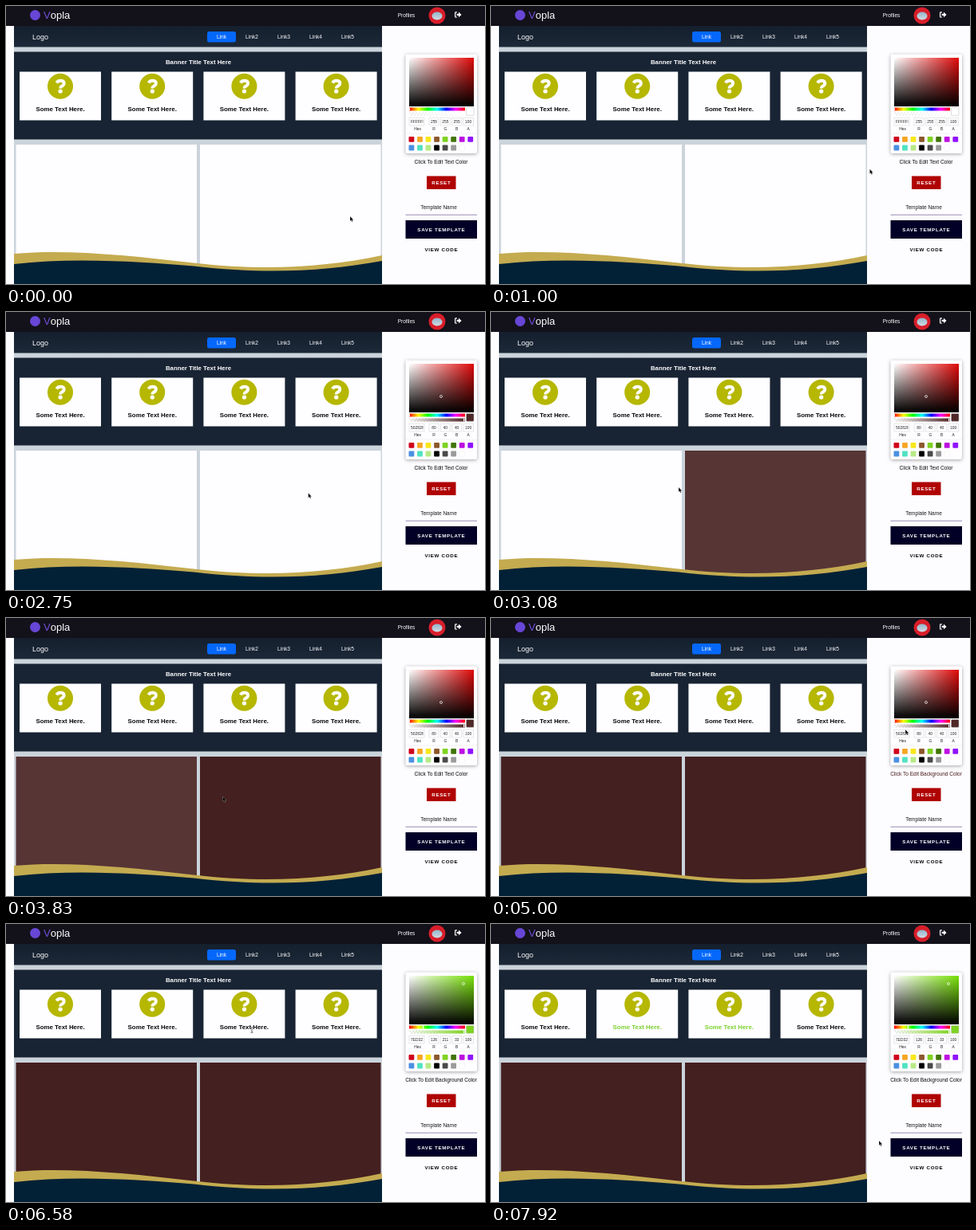
Animation, 600 px wide and 349 px high, one loop 8000 ms. Source, as an HTML page with a canvas:

```html
<!DOCTYPE html>
<html lang="en">
<head>
<meta charset="utf-8">
<title>Template editor</title>
<style>
  html, body { margin: 0; width: 100%; height: 100%; overflow: hidden; background: #fdfcfe; }
  canvas { display: block; width: 600px; height: 349px; }
</style>
</head>
<body>
<canvas id="stage"></canvas>
<script>
const LOOP = 8000;
const canvas = document.getElementById('stage');
const ctx = canvas.getContext('2d');
const ratio = window.devicePixelRatio || 1;
canvas.width = 600 * ratio;
canvas.height = 349 * ratio;

const INK = '#08080c', NAVY = '#182433', WHITE = '#fefdff';

// Clicks that change the page, in ms
const PICK_BROWN = 2150, FILL_RIGHT = 2800, FILL_LEFT = 3500,
      TEXT_MODE = 4500, PICK_GREEN = 5500, TINT_THIRD = 6660, TINT_SECOND = 7250;

const PICKS = [
  { from: PICK_GREEN, hex: '7ED321', rgb: [126, 211, 33], hue: 89, x: 573, y: 75 },
  { from: PICK_BROWN, hex: '502828', rgb: [80, 40, 40], hue: 0, x: 545, y: 106 },
  { from: 0, hex: 'FFFFFF', rgb: [255, 255, 255], hue: 0, x: 505.5, y: 65.5 }
];
const PRESETS = ('D0021B F5A623 F8E71C 8B572A 7ED321 417505 BD10E0 9013FE ' +
                 '4A90E2 50E3C2 B8E986 000000 4A4A4A 9B9B9B FFFFFF').split(' ');

// Pointer stops: time, x, y
const PATH = [
  [0, 431, 264], [500, 431, 264], [1700, 546, 107], [2250, 546, 107],
  [2650, 385, 226], [2820, 375, 228], [3080, 235, 220], [3350, 165, 236],
  [3550, 165, 236], [4350, 541, 195], [4600, 541, 195], [5000, 519, 140],
  [5380, 549, 167], [5600, 549, 167], [6450, 308, 133], [6750, 308, 133],
  [7130, 197, 131], [7370, 197, 131], [7900, 486, 272], [8000, 486, 272]
];

const clamp = v => Math.max(0, Math.min(1, v));
const smooth = v => v * v * (3 - 2 * v);

function pointerAt(t) {
  const i = PATH.findIndex(stop => stop[0] > t);
  const [t0, x0, y0] = PATH[i - 1], [t1, x1, y1] = PATH[i];
  const k = smooth((t - t0) / (t1 - t0));
  return [x0 + (x1 - x0) * k, y0 + (y1 - y0) * k];
}

function box(x, y, w, h, fill, radius = 0, stroke) {
  ctx.beginPath();
  ctx.roundRect(x, y, w, h, radius);
  if (fill) { ctx.fillStyle = fill; ctx.fill(); }
  if (stroke) { ctx.strokeStyle = stroke; ctx.lineWidth = 0.5; ctx.stroke(); }
}

function disc(x, y, r, fill) {
  ctx.beginPath();
  ctx.arc(x, y, r, 0, 7);
  ctx.fillStyle = fill;
  ctx.fill();
}

function text(str, x, y, size, color, { bold = false, align = 'center', spacing = 0 } = {}) {
  ctx.font = `${bold ? 'bold ' : ''}${size}px "Liberation Sans", Arial, sans-serif`;
  ctx.textAlign = align;
  ctx.letterSpacing = spacing + 'px';
  ctx.fillStyle = color;
  ctx.fillText(str, x + spacing / 2, y);
}

function gradient(x0, y0, x1, y1, colors) {
  const g = ctx.createLinearGradient(x0, y0, x1, y1);
  colors.forEach((c, i) => g.addColorStop(i / (colors.length - 1), c));
  return g;
}

function shape(path, fill, stroke, width) {
  const p = new Path2D(path);
  if (fill) { ctx.fillStyle = fill; ctx.fill(p); }
  if (stroke) { ctx.strokeStyle = stroke; ctx.lineWidth = width; ctx.stroke(p); }
}

function at(x, y, draw) {
  ctx.save();
  ctx.translate(x, y);
  draw();
  ctx.restore();
}

function header() {
  box(0, 0, 600, 25, '#13111a');
  disc(36.5, 11.5, 6.5, '#6846d6');
  text('V', 47, 16, 13, '#7350e0', { align: 'left' });
  const lead = ctx.measureText('V').width;
  text('opla', 47 + lead, 16, 13, WHITE, { align: 'left' });
  text('Profiles', 501.5, 13.7, 6.5, WHITE);
  disc(540, 12, 10.5, '#d81e2a');
  ctx.beginPath();
  ctx.ellipse(540, 12.5, 6.5, 5, 0, 0, 7);
  ctx.fillStyle = gradient(540, 7, 540, 18, ['#8fb2c8', '#d5dde5']);
  ctx.fill();
  shape('M565 7.8H563.2Q562.6 7.8 562.6 8.4V13.4Q562.6 14 563.2 14H565', null, WHITE, 1.2);
  shape('M564.6 9.8H567V7.6L570.6 10.9L567 14.2V12H564.6Z', WHITE);
}

function card(i, color) {
  const x = 17 + 115.2 * i, center = x + 51;
  box(x, 82.5, 102, 61, WHITE);
  disc(center, 100.8, 16, '#b5b700');
  at(center, 100.8, () => {
    shape('M-4.8 -4.4Q-2.8 -7.1 .3 -7.1C6 -7.1 5.6 -1.8 2 -.2Q.1 .8 .1 2.6', null, WHITE, 3.9);
    disc(0.1, 6.3, 2.7, WHITE);
  });
  text('Some Text Here.', center, 132, 7.9, color, { bold: true });
}

// White until clicked, then brown that settles into a deeper shade
function panelColor(t, click) {
  if (t < click) return WHITE;
  const k = smooth(clamp((t - click - 330) / 300));
  const mix = (a, b) => Math.round(a + (b - a) * k);
  return `rgb(${mix(87, 68)},${mix(53, 32)},${mix(53, 32)})`;
}

function page(t) {
  box(10, 25, 461, 324, '#cbd3db');
  box(10, 25, 461, 26.5, gradient(0, 25, 0, 52, ['#151f2d', '#1c2938']));
  text('Logo', 33, 41.6, 9, WHITE, { align: 'left' });
  box(252, 32, 36, 13.5, '#0568fb', 2.5);
  ['Link', 'Link2', 'Link3', 'Link4', 'Link5'].forEach((label, i) =>
    text(label, i ? 268 + 40 * i : 270, 41, 6.6, WHITE));

  box(10, 57.5, 461, 110, NAVY);
  text('Banner Title Text Here', 241, 73.2, 7.8, WHITE, { bold: true });
  const tints = [Infinity, TINT_SECOND, TINT_THIRD, Infinity];
  tints.forEach((click, i) => card(i, t < click ? INK : '#7bd12c'));

  box(12.5, 174, 226.5, 160, panelColor(t, FILL_LEFT));
  box(243, 174, 226.5, 160, panelColor(t, FILL_RIGHT));
  box(239, 174, 4, 160, '#cbd3db');
  shape('M10 311C75 305 155 313 235 322.5C325 333 400 328 471 313V349H10Z', '#c4ab50');
  shape('M10 324C85 315 170 321 235 326.5C325 337 400 333 471 320V349H10Z', '#022136');
}

function picker(t) {
  const pick = PICKS.find(p => t >= p.from);
  const color = '#' + pick.hex;

  ctx.save();
  ctx.shadowColor = 'rgba(0,0,0,.35)';
  ctx.shadowBlur = 4 * ratio;
  ctx.shadowOffsetY = ratio;
  box(500.5, 60.5, 89.5, 124.5, WHITE, 2);
  ctx.restore();

  box(505, 65, 81, 61, `hsl(${pick.hue} 92% 46%)`);
  box(505, 65, 81, 61, gradient(505, 0, 586, 0, ['#fff', '#fff0']));
  box(505, 65, 81, 61, gradient(0, 65, 0, 126, ['#0000', '#000']));
  ctx.beginPath();
  ctx.arc(pick.x, pick.y, 1.5, 0, 7);
  ctx.strokeStyle = '#fff';
  ctx.lineWidth = 0.7;
  ctx.stroke();

  const rainbow = [0, 60, 120, 180, 240, 300, 360].map(h => `hsl(${h} 100% 50%)`);
  box(505, 127.5, 70, 4, gradient(505, 0, 575, 0, rainbow));
  box(504.5 + pick.hue / 360 * 70, 127.7, 1.4, 3.6, '#fff');
  for (let i = 0; i < 70; i++)
    box(505 + 2 * (i >> 1), 133.5 + 2 * (i & 1), 2, 2, (i + (i >> 1)) & 1 ? '#fff' : '#e8e8e8');
  box(505, 133.5, 70, 4, gradient(505, 0, 575, 0, [color + '00', color]));
  box(573, 133.7, 1.4, 3.6, '#fff');
  box(576.5, 127.5, 9.5, 9.8, color, 1, '#bbb');

  const fields = [['Hex', pick.hex, 505, 19], ['R', pick.rgb[0], 530, 12],
                  ['G', pick.rgb[1], 544.3, 12], ['B', pick.rgb[2], 558.6, 12], ['A', 100, 572.9, 12.6]];
  for (const [label, value, x, w] of fields) {
    box(x, 140.3, w, 9.7, WHITE, 0, '#ccc');
    ctx.save();
    ctx.beginPath();
    ctx.rect(x + 1, 140, w - 2.5, 10);
    ctx.clip();
    if (label === 'Hex') text(value, x + 2, 147.1, 4.9, '#222', { align: 'left' });
    else text(String(value), x + w / 2, 147.1, 4.9, '#222');
    ctx.restore();
    text(label, x + w / 2 + (label === 'Hex' ? 1 : 0), 156, 4.9, '#222');
  }
  box(500.5, 159.7, 89.5, 0.5, '#e8e8e8');
  PRESETS.forEach((hex, i) =>
    box(504.5 + 10.55 * (i % 8), i < 8 ? 164 : 174.6, 6.8, 6.8, '#' + hex, 1, hex === 'FFFFFF' ? '#eee' : null));
}

function sidebar(t) {
  picker(t);
  const mode = t < TEXT_MODE ? 'Text' : 'Background';
  const hovered = t > TEXT_MODE && t < PICK_GREEN;
  text(`Click To Edit ${mode} Color`, 545, 198.2, 6.5, hovered ? '#4a1c1c' : INK);
  const button = { bold: true, spacing: 0.7 };
  box(527, 213.5, 36.5, 16.5, '#b00202');
  text('RESET', 545, 224, 6.2, WHITE, button);
  text('Template Name', 542, 255, 6.5, '#18181c');
  box(500.5, 261.8, 89.5, 0.8, '#74649a');
  box(500.5, 269, 89.5, 23, '#020026');
  text('SAVE TEMPLATE', 545, 282.7, 6.2, WHITE, button);
  text('VIEW CODE', 545, 308.2, 6.2, INK, button);
}

function pointer(t) {
  const [x, y] = pointerAt(t);
  const overText = y > 126 && y < 135 && (Math.abs(x - 298) < 31 || Math.abs(x - 183) < 31);
  at(x, y, () => {
    if (overText) shape('M-1.3 -3.5Q0 -3.5 0 -2.5Q0 -3.5 1.3 -3.5M0 -2.5V2.5M-1.3 3.5Q0 3.5 0 2.5Q0 3.5 1.3 3.5', null, '#222', 0.7);
    else shape('M0 0V6L1.4 4.8L2.4 7L3.4 6.5L2.5 4.4H4.3Z', '#000', 'rgba(255,255,255,.6)', 0.4);
  });
}

function render(now) {
  const t = now % LOOP;
  ctx.setTransform(ratio, 0, 0, ratio, 0, 0);
  box(0, 0, 600, 349, '#fdfcfe');
  page(t);
  header();
  sidebar(t);
  pointer(t);
}

const start = performance.now();
function tick() {
  render(performance.now() - start);
  requestAnimationFrame(tick);
}
tick();
</script>
</body>
</html>
```
